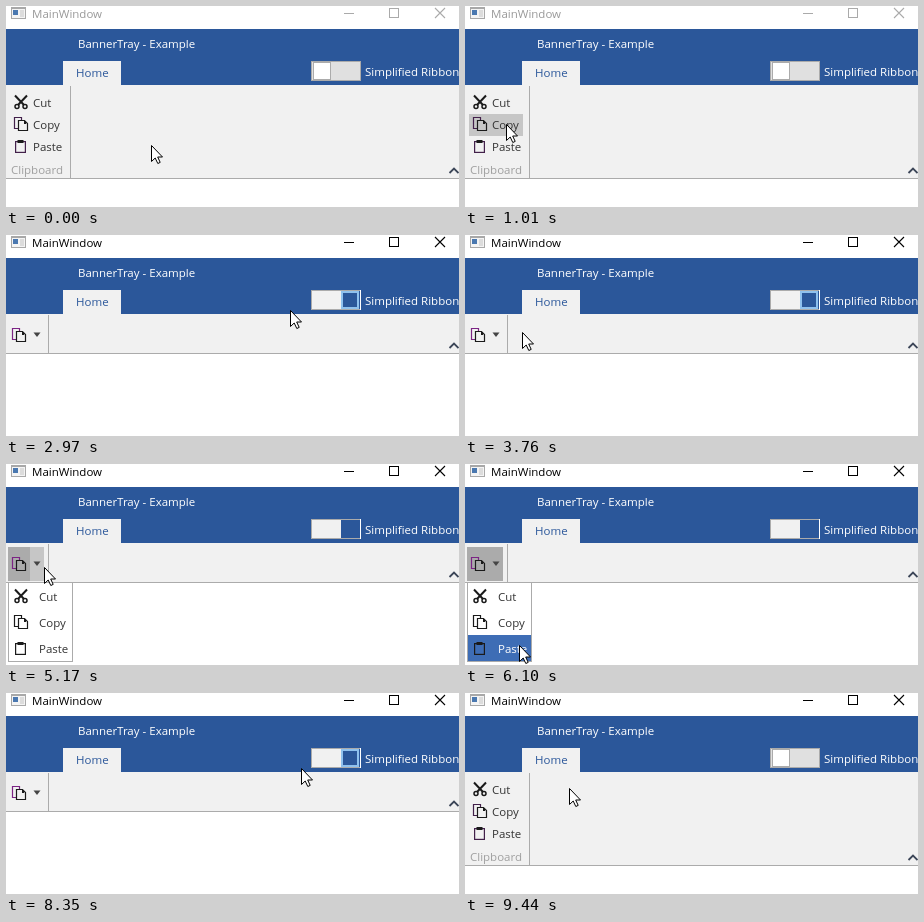
Animation, 453 px wide and 201 px high, one loop 9.52 s. Source, as an HTML page with a canvas:

```html
<!DOCTYPE html>
<html lang="en">
<head>
<meta charset="utf-8">
<title>Simplified ribbon</title>
<style>
  html, body { margin: 0; width: 100%; height: 100%; overflow: hidden; background: #fff; }
  canvas { display: block; }
</style>
</head>
<body>
<canvas id="stage" width="453" height="201"></canvas>
<script>
const ctx = document.getElementById('stage').getContext('2d');
const LOOP = 9520;
const BLUE = '#2b579a', PANEL = '#f1f1f1', LINE = '#ababab', HOVER = '#c6c6c6', PRESSED = '#ababab', INK = '#1a1a1a';
const LABELS = ['Cut', 'Copy', 'Paste'];

// Moments when the window state switches
const ACTIVATE = 2730, SIMPLIFY = 2800, OPEN = 4860, CLOSE = 7880, RESTORE = 8670;

// Places the pointer visits
const START = { x: 145, y: 139 };
const ribbonRow = i => ({ x: 41, y: 96 + 22 * i });
const menuItem = i => ({ x: 54, y: 139 + 21 * i });
const toggle = (dx, dy) => ({ x: 305 + dx, y: 55 + dy });
const panel = (x, dy) => ({ x, y: 79 + dy });

// Each trip eases from wherever the pointer rests
const TRIPS = [
  { from: 0, to: 860, goal: ribbonRow(0) },
  { from: 860, to: 1010, goal: ribbonRow(1) },
  { from: 1010, to: 1320, goal: ribbonRow(2) },
  { from: 1400, to: 1790, goal: ribbonRow(0) },
  { from: 1870, to: 2490, goal: toggle(27, 15) },
  { from: 2900, to: 3670, goal: panel(57, 18) },
  { from: 3760, to: 4160, goal: panel(12, 28) },
  { from: 4320, to: 4700, goal: panel(33, 27) },
  { from: 5100, to: 5170, goal: panel(38, 24) },
  { from: 5170, to: 6100, goal: menuItem(2) },
  { from: 6340, to: 6940, goal: menuItem(0) },
  { from: 7260, to: 7730, goal: menuItem(2) },
  { from: CLOSE, to: 8520, goal: toggle(8, 12) },
  { from: 9140, to: 9440, goal: panel(104, 16) }
];

const easeOut = u => 1 - (1 - u) ** 2;
const clamp = u => Math.max(0, Math.min(1, u));

function pointerAt(t) {
  let { x, y } = START;
  for (const { from, to, goal } of TRIPS) {
    const k = easeOut(clamp((t - from) / (to - from)));
    x += (goal.x - x) * k;
    y += (goal.y - y) * k;
  }
  return { x: Math.round(x), y: Math.round(y) };
}

const ARROW = new Path2D('M.5 .5V16.5L4.2 13L6.8 18.5L9.2 17.4L6.7 12H11.5Z');
const HAND = new Path2D('M-2 14V2Q-2 .5 0 .5T2 2V9Q2 8 4 8T6 10Q7 9 8.5 9.5T10 11.5Q12 11 12 13V17Q12 20 10 21.5V23.5H0V22L-4.5 15.5Q-7 12-4 12Z');

function rect(x, y, w, h, color) {
  ctx.fillStyle = color;
  ctx.fillRect(x, y, w, h);
}

function frame(x, y, w, h, color, width = 1) {
  ctx.strokeStyle = color;
  ctx.lineWidth = width;
  ctx.strokeRect(x + width / 2, y + width / 2, w - width, h - width);
}

function text(str, x, y, color, weight = 400) {
  ctx.font = `${weight} 11.5px "Open Sans", "Noto Sans", sans-serif`;
  ctx.fillStyle = color;
  ctx.fillText(str, x, y);
}

function stroke(path, color, width = 1) {
  ctx.strokeStyle = color;
  ctx.lineWidth = width;
  ctx.stroke(typeof path === 'string' ? new Path2D(path) : path);
}

function at(x, y, draw) {
  ctx.save();
  ctx.translate(x, y);
  draw();
  ctx.restore();
}

const ICONS = {
  Cut() {
    stroke('M1 .5L10 10M13 .5L4 10', INK, 2);
    for (const x of [3, 11]) {
      ctx.beginPath();
      ctx.arc(x, 11.5, 2, 0, 2 * Math.PI);
      ctx.lineWidth = 1.5;
      ctx.stroke();
    }
  },
  Copy(accent) {
    stroke('M4 11.5H.5V.5H7.5V3', accent, 1.2);
    stroke('M4.5 3.5H10.5L13.5 6.5V13.5H4.5Z', INK, 1.2);
    rect(10, 4, 2, 3, INK);
  },
  Paste(accent) {
    frame(1, 2, 11, 12, accent, 1.2);
    rect(3.5, 1, 6, 3, INK);
  }
};

function icon(name, x, y, accent = INK) {
  at(x, y, () => ICONS[name](accent));
}

function drawTitleBar(active) {
  const ink = active ? '#000' : '#999', control = active ? '#000' : '#aaa';
  rect(5, 1, 15, 12, '#a8a8a8');
  rect(6, 3, 13, 9, '#f4f4f4');
  rect(7, 4, 5, 5, '#4a78b0');
  rect(14, 4, 4, 7, '#dcdcdc');
  text('MainWindow', 26, 12, ink);
  rect(338, 7, 10, 1, control);
  frame(383, 2, 10, 10, control);
  stroke('M429 2L439 12M439 2L429 12', control, 1.1);
}

function drawToggle(on, focused) {
  rect(305, 55, 50, 20, on ? PANEL : '#e0e0e0');
  frame(305, 55, 50, 20, LINE);
  if (on) {
    rect(335, 56, 19, 18, BLUE);
    rect(354, 55, 1, 20, '#fff');
    if (focused) frame(335, 56, 18, 18, '#8fc1ee', 2);
  } else {
    rect(307, 56, 18, 18, '#fff');
    frame(307, 56, 18, 18, LINE);
  }
}

function drawPanel(bottom, separator) {
  rect(0, 79, 453, bottom - 79, PANEL);
  rect(0, bottom, 453, 1, LINE);
  rect(separator, 80, 1, bottom - 80, LINE);
  at(448, bottom - 10, () => stroke('M-4.5 5L0 .5L4.5 5', '#3c4658', 1.8));
}

function drawFullRibbon({ x, y }) {
  drawPanel(172, 64);
  LABELS.forEach((label, i) => {
    const top = 86 + 22 * i;
    if (x >= 4 && x < 58 && y >= top && y < top + 22) rect(4, top, 54, 22, HOVER);
    icon(label, 8, top + 3, '#42204a');
    text(label, 27, top + 15, '#333');
  });
  text('Clipboard', 5, 168, '#a0a0a0');
}

function drawSimpleRibbon({ x, y }, open) {
  drawPanel(118, 42);
  const over = x >= 2 && x < 39 && y >= 83 && y < 117;
  if (open) rect(2, 83, 36, 34, PRESSED);
  if (over) rect(open ? 24 : 2, 83, open ? 14 : 36, 34, HOVER);
  icon('Copy', 6, 93, '#7c2484');
  ctx.fillStyle = '#444';
  ctx.fill(new Path2D('M27.5 97.5H34.5L31 102Z'));
}

function drawMenu({ y }) {
  rect(2, 118, 65, 80, '#fff');
  frame(2, 118, 65, 80, LINE);
  LABELS.forEach((label, i) => {
    const top = 119 + 26 * i, over = y >= top && y < top + 26;
    if (over) rect(3, top, 63, 26, '#3e6db5');
    icon(label, 8, top + 6);
    text(label, 33, top + 18, over ? '#fff' : '#333', over ? 500 : 400);
  });
}

function drawPointer({ x, y }) {
  const hand = x >= 305 && x < 355 && y >= 55 && y < 75;
  at(x, y, () => {
    const shape = hand ? HAND : ARROW;
    ctx.fillStyle = '#fff';
    ctx.fill(shape);
    stroke(shape, '#000');
    if (hand) stroke('M2 8V12.5M6 10V13M9.7 11.5V14', '#000');
  });
}

function render(t) {
  const pointer = pointerAt(t);
  const simple = t >= SIMPLIFY && t < RESTORE;
  const open = t >= OPEN && t < CLOSE;

  rect(0, 0, 453, 201, '#fff');
  drawTitleBar(t >= ACTIVATE);
  rect(0, 23, 453, 56, BLUE);
  text('BannerTray - Example', 72, 42, '#fff', 500);
  rect(57, 55, 58, 24, PANEL);
  text('Home', 70, 71, BLUE);
  drawToggle(simple, !open);
  text('Simplified Ribbon', 359, 70, '#fff', 500);
  if (simple) drawSimpleRibbon(pointer, open);
  else drawFullRibbon(pointer);
  if (open) drawMenu(pointer);
  drawPointer(pointer);
}

function tick() {
  render(performance.now() % LOOP);
  requestAnimationFrame(tick);
}
tick();
</script>
</body>
</html>
```
